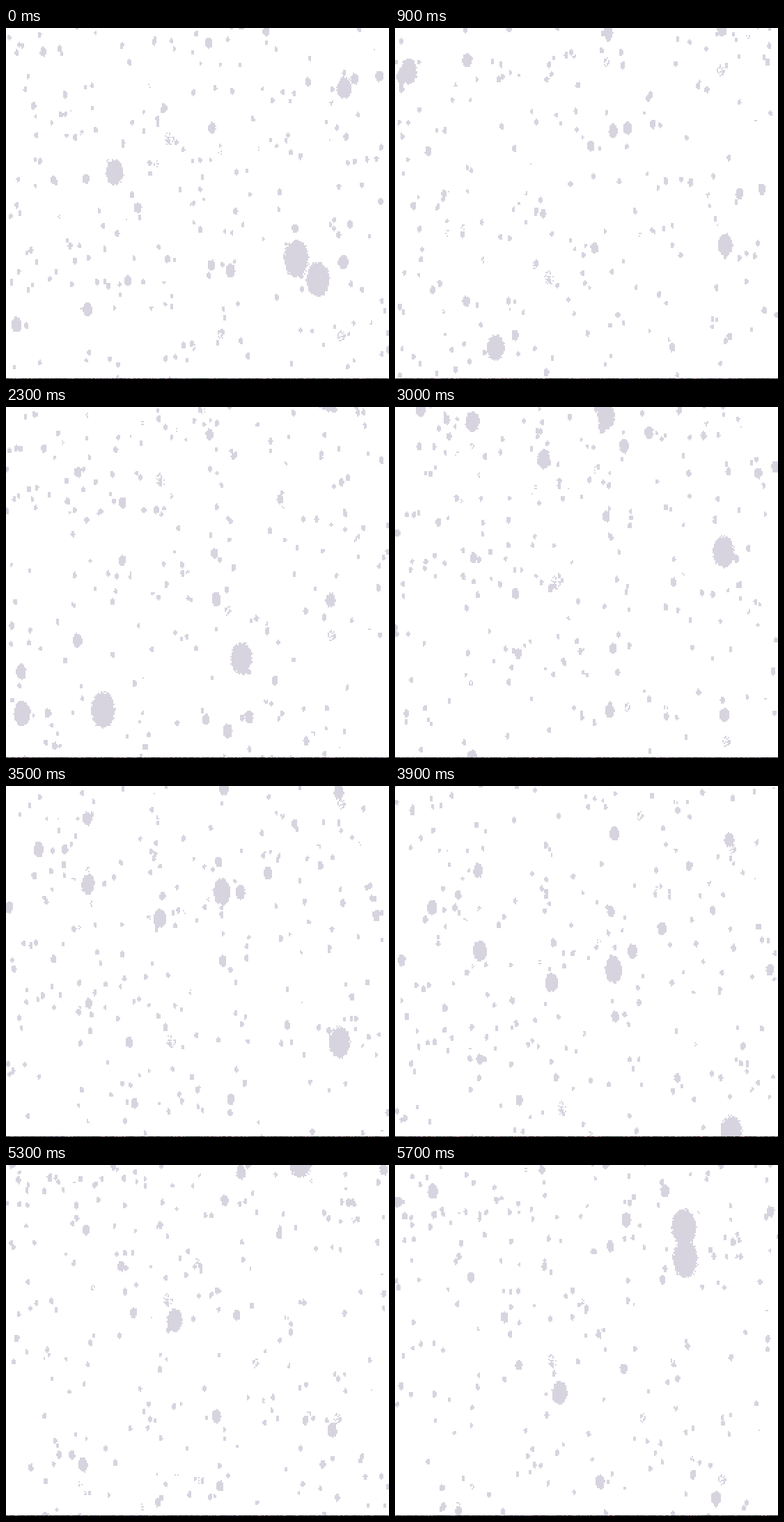
Animation, 550 px wide and 504 px high, one loop 5.8 s. Source, as an HTML page with a canvas:

```html
<!DOCTYPE html>
<html lang="en">
<head>
<meta charset="utf-8">
<title>Snowfall</title>
<style>
  html, body { margin: 0; height: 100%; overflow: hidden; background: #fff; }
  canvas { display: block; }
</style>
</head>
<body>
<canvas width="550" height="504"></canvas>
<script>
const W = 550, H = 504, STEP = 100, STEPS = 58, CELL = 2;
const ctx = document.querySelector('canvas').getContext('2d');

// The largest flakes: a step, the place passed at that step, and the radius
const near = [
  [0, 417, 331, 27], [0, 448, 361, 25], [0, 156, 207, 19], [0, 486, 86, 16],
  [9, 20, 62, 18], [16, 333, 137, 23], [16, 134, 190, 26],
  [30, 472, 208, 23], [30, 303, 12, 19], [30, 214, 75, 14], [30, 111, 21, 15],
  [47, 248, 67, 17], [57, 415, 90, 27], [57, 417, 135, 27]
];

function random(seed) {
  const s = Math.sin(seed * 12.9898) * 43758.5453;
  return s - Math.floor(s);
}

// Nearer flakes look larger and fall faster
const speed = radius => 9 + radius;

// Sideways shift by a wind that turns once per loop
const wind = step => -14 * Math.sin(2 * Math.PI * step / STEPS);

const far = Array.from({ length: 260 }, (_, i) => {
  const r = k => random(i * 7 + k + 1);
  return {
    x: r(0) * W,
    phase: r(1),
    radius: 3 + 2 * r(2) + 8 * r(3) ** 14,
    drift: (r(4) - 0.5) * 2,
    fill: r(5) < 0.12 ? 0.5 : 1
  };
});

// An upright oval with a ragged edge, built from square cells
function flake(x, y, radius, seed, fill = 1) {
  const ry = radius / CELL, rx = ry * 0.66;
  const cx = x / CELL, cy = y / CELL;
  const left = Math.floor(cx - rx), top = Math.floor(cy - ry);
  for (let j = 0; j <= 2 * ry + 1; j++) {
    for (let i = 0; i <= 2 * rx + 1; i++) {
      const d = ((left + i + 0.5 - cx) / rx) ** 2 + ((top + j + 0.5 - cy) / ry) ** 2;
      const noise = random(seed + i * 3.7 + j * 17.3);
      if (d < 0.8 + 0.35 * noise && noise < fill)
        ctx.fillRect((left + i) * CELL, (top + j) * CELL, CELL, CELL);
    }
  }
}

// A one-pixel strip of dark specks along the bottom
function ground(step) {
  for (let x = 0; x < W; x += CELL) {
    const n = random(x + step * 0.37);
    ctx.fillStyle = `hsl(${n * 360}, 20%, ${10 + 40 * n * n}%)`;
    ctx.fillRect(x, H - 1, CELL, 1);
  }
}

function draw(step) {
  ctx.fillStyle = '#fff';
  ctx.fillRect(0, 0, W, H);
  ctx.fillStyle = '#d7d4df';
  far.forEach((f, i) => {
    const p = (f.phase + step * speed(f.radius) / H) % 1;
    const x = (f.x + f.drift * step + wind(step) + W) % W;
    flake(x, (H + 30) * p ** 1.2 - 15, f.radius, i, f.fill);
  });
  for (const [t, x, y, r] of near)
    flake(x + wind(step) - wind(t), y + speed(r) * (step - t), r, x);
  ground(step);
}

const start = performance.now();
let shown = -1;
function tick() {
  const step = Math.floor((performance.now() - start) / STEP) % STEPS;
  if (step !== shown) draw(shown = step);
  requestAnimationFrame(tick);
}
tick();
</script>
</body>
</html>
```
